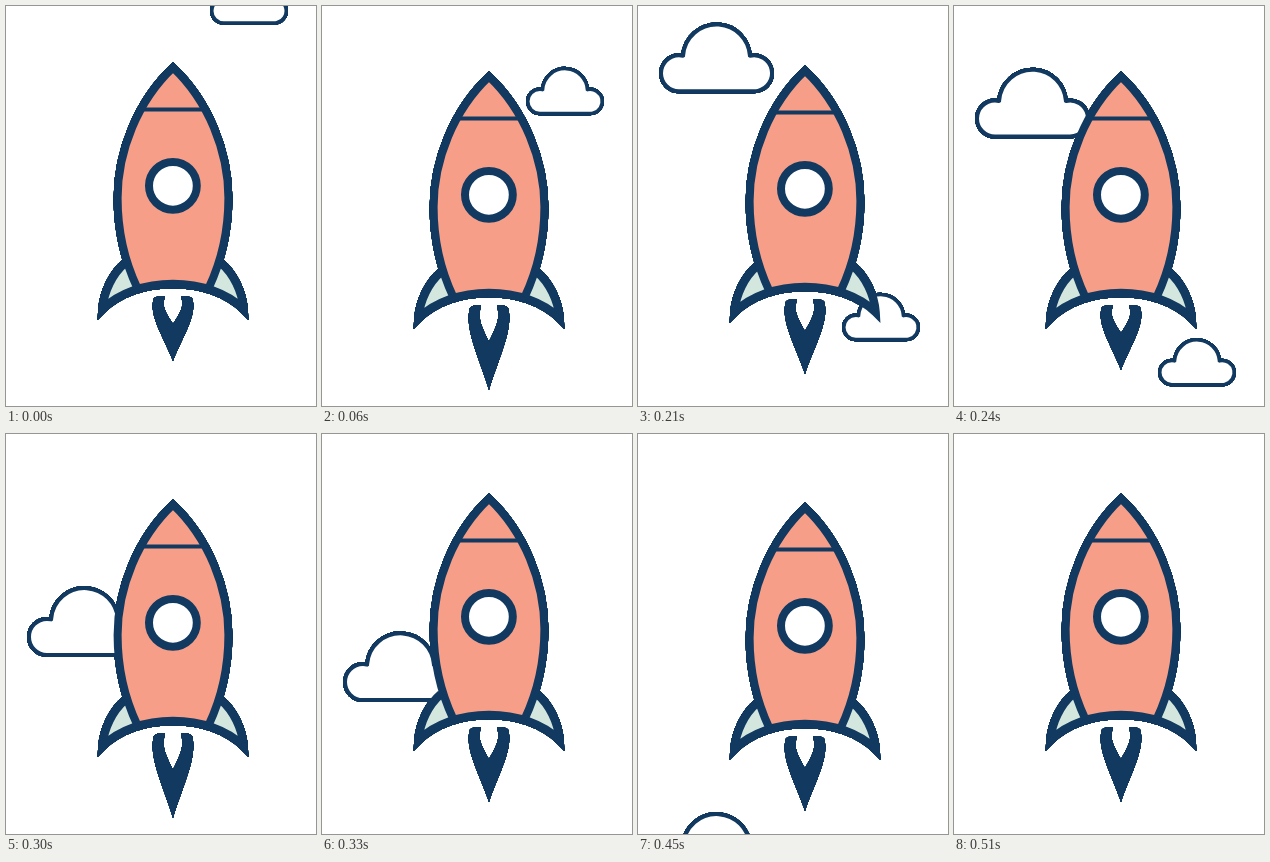
Write an HTML page with a canvas that moves like this. It is 310 px wide and 400 px high and loops after 0.54 s.

```html
<!DOCTYPE html>
<html lang="en">
<head>
<meta charset="utf-8">
<title>Rocket</title>
<style>
  html, body { margin: 0; width: 100%; height: 100%; overflow: hidden; background: #fff; }
  canvas { display: block; }
</style>
</head>
<body>
<canvas id="stage" width="310" height="400"></canvas>
<script>
const canvas = document.getElementById('stage');
const ctx = canvas.getContext('2d');
const NAVY = '#123960', SALMON = '#f69e87', MINT = '#d3e7de', WHITE = '#fff';
const STEP = 30, STEPS = 18, CLOUD_SPEED = 45.2;

const fins = new Path2D(`M119 257 C107 267 97.4 286 96.4 303.3 C113 287 139 278 167 278
  C195 278 221 287 237.6 303.3 C236.6 286 227 267 215 257`);
const sides = `M131.3 282 C118.6 255 111.6 225 111.6 192 C111.6 145 132 94.5 167 61.6
  C202 94.5 222.4 145 222.4 192 C222.4 225 215.4 255 202.7 282`;
const hull = new Path2D(sides);
const hullFill = new Path2D(sides + ' Q167 274 131.3 282 Z');
const flame = new Path2D(`M148 292 Q153 289 159 290.5 C156 300 158 304 167 318
  C176 304 178 300 175 290.5 Q181 289 186 292 C192 308 177 330 167 355
  C157 330 142 308 148 292 Z`);

function paint(path, fill, width) {
  if (fill) {
    ctx.fillStyle = fill;
    ctx.fill(path);
  }
  if (width) {
    ctx.strokeStyle = NAVY;
    ctx.lineWidth = width;
    ctx.stroke(path);
  }
}

function drawCloud(centerX, bottom, scale, width) {
  const base = bottom - width / 2;
  const lobe = 18 * scale, spread = 37.5 * scale;
  const tilt = 1.35, lift = 0.07;
  const cloud = new Path2D();
  cloud.arc(centerX - spread, base - lobe, lobe, Math.PI / 2, -tilt);
  cloud.arc(centerX, base - 33.3 * scale, 33.5 * scale, Math.PI + lift, -lift);
  cloud.arc(centerX + spread, base - lobe, lobe, Math.PI + tilt, Math.PI / 2);
  cloud.closePath();
  paint(cloud, WHITE, width);
}

function drawRocket(bob, stretch) {
  ctx.save();
  ctx.translate(0, bob);

  ctx.save();
  ctx.translate(0, 290);
  ctx.scale(1, 1 + stretch / 65);
  ctx.translate(0, -290);
  paint(flame, NAVY);
  ctx.restore();

  paint(fins, MINT);
  paint(hullFill, SALMON);
  paint(fins, null, 8.4);
  ctx.fillStyle = NAVY;
  ctx.fillRect(137, 101.5, 60, 4);
  paint(hull, null, 8);

  const porthole = new Path2D();
  porthole.arc(166.9, 179.8, 23.9, 0, 2 * Math.PI);
  paint(porthole, WHITE, 8);
  ctx.restore();
}

// Stacking the picture on itself makes the soft outer edges opaque and crisp.
function hardenEdges() {
  for (let pass = 0; pass < 4; pass++) ctx.drawImage(canvas, 0, 0);
}

function render(now) {
  const step = Math.floor(now / STEP) % STEPS;
  const bob = 6 * (1 - Math.cos(step * Math.PI / 3));
  const stretch = 10 * (1 - Math.cos(step * Math.PI / 2));

  ctx.clearRect(0, 0, canvas.width, canvas.height);
  drawCloud(243, 18.8 + CLOUD_SPEED * step, 0.671, 3.5);
  drawCloud(243, 18.8 + CLOUD_SPEED * (step - STEPS), 0.671, 3.5);
  drawCloud(78.5, 132.5 + CLOUD_SPEED * (step - 8), 1, 4);
  drawRocket(bob, stretch);
  hardenEdges();
}

const start = performance.now();
function tick() {
  render(performance.now() - start);
  requestAnimationFrame(tick);
}
tick();
</script>
</body>
</html>
```
